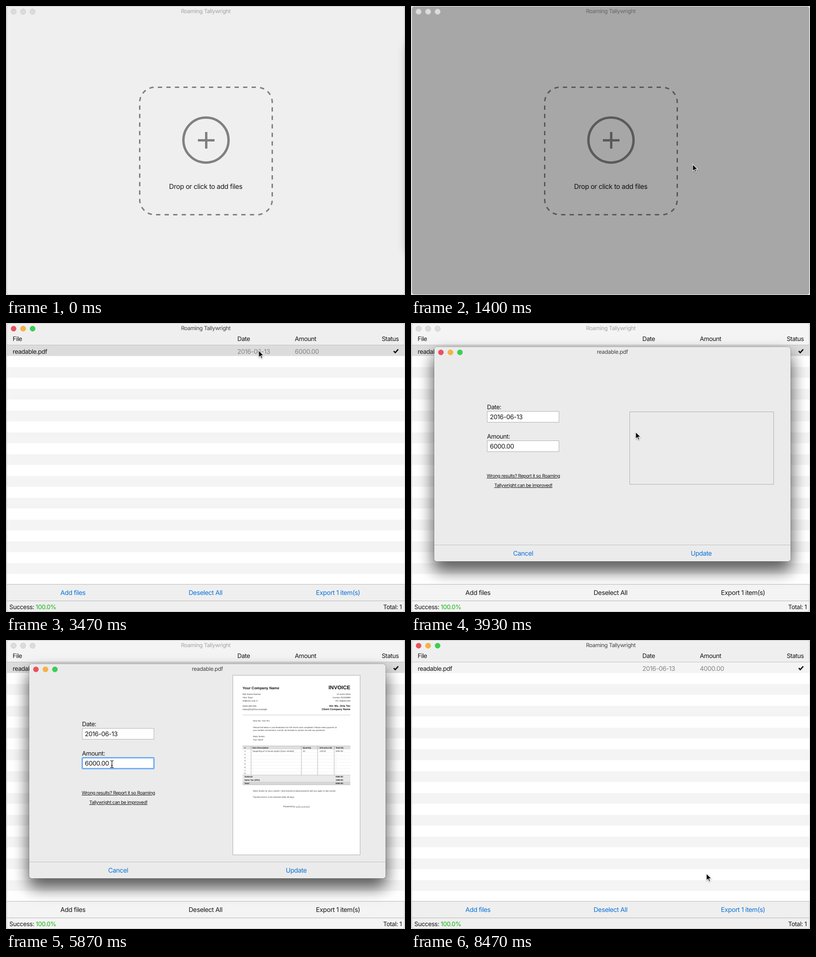
Animation of 840 by 610 pixels, one loop 8540 ms. Source, as an HTML page:

```html
<!DOCTYPE html>
<html lang="en">
<head>
<meta charset="utf-8">
<title>Roaming Tallywright</title>
<style>
html, body { margin: 0; width: 100%; height: 100%; overflow: hidden; background: #dedede; }
svg { display: block; width: 840px; height: 610px; }
text { font: 13px Inter, "Open Sans", sans-serif; letter-spacing: -.45px; fill: #161616; white-space: pre; text-rendering: geometricPrecision; }
.title { font-size: 11.7px; letter-spacing: -.4px; fill: #444; }
.num { font-size: 13.4px; letter-spacing: -.42px; }
.big { font-size: 14.3px; letter-spacing: -.4px; }
.btn { font-size: 13.6px; letter-spacing: -.42px; fill: #0a72d8; }
.note { font-size: 9.8px; letter-spacing: -.4px; text-decoration: underline; }
.grey { fill: #858585; }
.mid { text-anchor: middle; }
.end { text-anchor: end; }
#page text { font: 4.7px "Liberation Sans", Arial, sans-serif; letter-spacing: 0; fill: #333; }
#page .b { font-weight: bold; fill: #111; }
#page .s { font-size: 4.3px; }
</style>
</head>
<body>
<svg id="stage" viewBox="0 0 840 610"></svg>
<script>
const LOOP = 8540, STEP = 200 / 3;
const APP = ['Roaming', 'Tallywright'];

const text = (x, y, s, cls = '', more = '') => `<text x="${x}" y="${y}" class="${cls}" ${more}>${s}</text>`;
const rect = (x, y, w, h, fill, more = '') => `<rect x="${x}" y="${y}" width="${w}" height="${h}" fill="${fill}" ${more}/>`;
const line = (x1, y1, x2, y2, c, w = 1) => `<path d="M${x1} ${y1}L${x2} ${y2}" stroke="${c}" stroke-width="${w}" fill="none"/>`;
const range = n => [...Array(n).keys()];
const hues = ['#ee4f5c', '#f8b33e', '#38d150'];
const lights = (x, y) => hues.map((c, i) =>
  `<circle cx="${x + 20 * i}" cy="${y}" r="5.7" fill="${c}" stroke="#000" stroke-opacity=".08"/>`).join('');

// The dashed outline holds 58 dashes, with gaps as long as the dashes.
function dropView() {
  return `<g id="drop">
    <g fill="none" stroke="#808080">
      <rect x="281.5" y="171.5" width="279" height="269" rx="32" stroke-width="3" pathLength="116" stroke-dasharray="1 1" stroke-dashoffset="-.69"/>
      <circle cx="421" cy="283" r="47.5" stroke-width="5"/>
      <path d="M404 283.5H439M421.5 266V301" stroke-width="5"/>
    </g>
    ${text(420.5, 386, 'Drop or click to add files', 'big mid')}
    ${rect(850, 80, 60, 440, '#000', 'id="edge" opacity=".5" style="filter:blur(12px)"')}
  </g>`;
}

function listView() {
  const stripes = range(11).map(i => rect(2, 47 + 46 * i, 837, 22.5, '#f4f4f4')).join('');
  return `<g id="list">
    ${rect(2, 46, 837, 505, '#fff')}${stripes}
    ${rect(2, 47, 837, 22.5, '#dcdcdc', 'id="picked"')}
    ${line(2, 46.5, 839, 46.5, '#c2c2c2')}
    ${text(14, 38, 'File')}${text(487, 38, 'Date')}${text(608, 38, 'Amount')}${text(827, 38, 'Status', 'end')}
    ${text(14, 65, 'readable.pdf')}
    ${text(487, 65, '2016-06-13', 'num grey')}${text(608, 65, '', 'num grey', 'id="sum"')}
    <path d="M816.3 59.3l3.2 3.3 6.2-6.9" fill="none" stroke="#111" stroke-width="2.7"/>
    ${line(2, 551.5, 839, 551.5, '#b9b9b9')}${line(2, 586.5, 839, 586.5, '#b9b9b9')}
    <g id="tools">${text(141, 574, 'Add files', 'btn mid')}${text(420, 574, '', 'btn mid', 'id="all"')}${text(699, 574, '', 'btn mid', 'id="export"')}</g>
    ${text(7, 604, 'Success: <tspan fill="#0fb50f">100.0%</tspan>')}
    ${text(833, 604, 'Total: 1', 'end')}
  </g>`;
}

function invoice() {
  const t = text, cols = [516, 622, 656, 691];
  const body = [
    [171, 'Dear Ms. Orla Tev,'],
    [184.5, 'Please find below a cost-breakdown for the recent work completed. Please make payment at'],
    [191, 'your earliest convenience, and do not hesitate to contact me with any questions.'],
    [204, 'Many thanks,'], [211, 'Your Name'],
    [319, 'Many thanks for your custom! I look forward to doing business with you again in due course.'],
    [332, 'Payment terms: to be received within 60 days.']
  ].map(([y, s]) => t(520, y + 1.3, s, 's')).join('');
  const rows = range(8).map(i => {
    const y = 236.2 + 6.75 * i;
    return t(502, y, i + 1, 's') + (i ? t(694, y, '-', 's') + line(498, y - 5.2, 725, y - 5.2, '#e6e6e6', .5) : '');
  }).join('');
  const sums = [['Subtotal', '5000.00'], ['Sales Tax (20%)', '1000.00'], ['Total', '6000.00']].map(([a, b], i) =>
    rect(498, 285 + 6.9 * i, 227, 6.9, i > 1 ? '#d6d6d6' : '#e9e9e9') +
    t(502, 290.2 + 6.9 * i, a, 'b s') + t(694, 290.2 + 6.9 * i, b, 'b s')).join('');
  return `<g id="page">
    ${rect(477.5, 74.5, 268, 379, '#fff', 'stroke="#b0b0b0"')}
    ${t(498, 103.5, 'Your Company Name', 'b', 'style="font-size:7.7px"')}
    ${t(725, 104, 'INVOICE', 'b end', 'style="font-size:11.2px"')}
    ${t(498, 115.5, '940 Some Avenue')}${t(498, 122.5, 'Your Town')}${t(498, 129.5, 'Address Line 3')}
    ${t(498, 141, '(000) 000 000')}${t(498, 148, 'inbox@myfirma.example')}
    ${t(725, 115.5, '13-June-2016', 'end')}${t(725, 122.5, 'Invoice #2334889', 'end')}${t(725, 129.5, 'PO 456001200', 'end')}
    ${t(725, 141, 'Att: Ms. Orla Tev', 'b end', 'style="font-size:5.7px"')}
    ${t(725, 148, 'Client Company Name', 'b end', 'style="font-size:5.7px"')}
    ${line(498, 158.3, 725, 158.3, '#bbb', .8)}
    ${body}
    ${rect(498, 223.5, 227, 7.3, '#dedede')}
    ${t(502, 229, '#', 'b s')}${t(519, 229, 'Item Description', 'b s')}${t(625, 229, 'Quantity', 'b s')}${t(660, 229, 'Unit price (€)', 'b s')}${t(694, 229, 'Total (€)', 'b s')}
    ${rows}${t(519, 236.2, 'Supporting of in-house project (hours worked)', 's')}${t(625, 236.2, '40', 's')}${t(660, 236.2, '125.00', 's')}${t(694, 236.2, '5000.00', 's')}
    ${cols.map(x => line(x, 224, x, 285, '#999', .7)).join('')}
    ${sums}
    ${line(498, 223.5, 725, 223.5, '#aaa', .6)}${line(498, 285, 725, 285, '#aaa', .6)}${line(498, 305.7, 725, 305.7, '#aaa', .6)}
    ${t(611.5, 352.5, 'Powered by <tspan fill="#888" text-decoration="underline">quillo.example</tspan>', 'mid')}
  </g>`;
}

function detailView() {
  const field = y => rect(160.5, y, 151, 23, '#fff', 'stroke="#b2b2b2"');
  return `<g id="detail">
    ${rect(49, 51, 750, 452, '#ebebeb', 'rx="5" style="filter:drop-shadow(0 18px 17px rgba(0,0,0,.55)) drop-shadow(0 0 1px rgba(0,0,0,.45))"')}
    ${line(53, 51.5, 795, 51.5, '#f8f8f8')}
    ${lights(63, 62)}${text(424, 65, 'readable.pdf', 'title mid')}
    ${text(160, 182, 'Date:')}${field(186.5)}${text(166, 203, '2016-06-13', 'num')}
    ${text(160, 244, 'Amount:')}${field(248.5)}
    ${rect(160.5, 248.5, 151, 23, 'none', 'id="focus" rx="2" stroke="#78b0f3" stroke-width="3"')}
    ${rect(166, 252, 0, 16, '#b4d5fe', 'id="mark"')}
    ${text(166, 265, '', 'num', 'id="amount"')}
    ${rect(166, 252, 1, 16, '#111', 'id="caret"')}
    ${text(236.5, 326, 'Wrong results? Report it so ' + APP[0], 'note mid')}
    ${text(236.5, 346, APP[1] + ' can be improved!', 'note mid')}
    ${rect(460.5, 187.5, 303, 153, 'none', 'id="empty" stroke="#b0b0b0"')}
    ${invoice()}
    <g id="pressed">
      <path d="M49 469H424V503H54Q49 503 49 498Z" fill="#f5f5f5"/>
      <path d="M424 469H799V498Q799 503 794 503H424Z" fill="#4f97f7"/>
    </g>
    ${line(49, 468.5, 799, 468.5, '#c0c0c0')}
    ${text(236, 491, 'Cancel', 'btn mid')}${text(611, 491, 'Update', 'btn mid', 'id="update"')}
  </g>`;
}

document.getElementById('stage').innerHTML = `
  ${rect(1.5, .5, 837.5, 609, '#efefef', 'id="frame" rx="5" stroke="#bdbdbd"')}
  ${dropView()}${listView()}
  ${rect(2, 1, 836.5, 608, '#000', 'id="dim" rx="5" opacity=".3"')}
  <g id="off">${range(3).map(i => `<circle cx="${16 + 20 * i}" cy="12" r="5.7" fill="#dcdcdc" stroke="#cfcfcf"/>`).join('')}</g>
  <g id="on">${lights(16, 12)}</g>
  ${text(420.5, 15, APP.join(' '), 'title mid', 'id="name"')}
  ${detailView()}
  <g id="pointer">
    <circle id="ring" r="22.3" cy=".5" fill="#fff" fill-opacity=".12" stroke="#111" stroke-width="1.6"/>
    <path id="arrow" d="M0 0V14.6L3.4 11.4 5.7 16.8 8.1 15.8 5.8 10.5H10.6Z" fill="#000" stroke="#fff" stroke-width="1.1" style="filter:drop-shadow(0 1px 1px rgba(0,0,0,.35))"/>
    <path id="beam" d="M-3.5-7.5Q0-7.5 0-5Q0-7.5 3.5-7.5M0-5V5M-3.5 7.5Q0 7.5 0 5Q0 7.5 3.5 7.5M-2 2.5H2" fill="none" stroke="#111" stroke-width="1.2"/>
  </g>`;

const el = Object.fromEntries([...document.querySelectorAll('[id]')].map(e => [e.id, e]));
const show = (id, on) => { el[id].style.display = on ? '' : 'none'; };
const put = (id, s) => { if (el[id].textContent !== s) el[id].textContent = s; };

// time, x, y
const path = [
  [500, 856, 425], [1333, 593, 334], [1600, 593, 334], [2467, 547, 87], [2733, 532, 58], [3467, 532, 58],
  [3933, 473, 230], [4100, 466, 240], [4700, 466, 240], [5533, 223, 262], [5933, 223, 262],
  [6200, 164, 262], [6733, 164, 262], [7533, 622, 493], [LOOP, 622, 493]
];
const presses = [[500, 1380], [3250, 3310], [3390, 3450], [5650, 5730], [5950, 6210], [7850, 8080]];
const OPEN = 3520, CLOSE = 8180;

function locate(t) {
  const i = path.findIndex(p => p[0] > t);
  if (i < 1) return path[i ? path.length - 1 : 0].slice(1);
  const [t0, x0, y0] = path[i - 1], [t1, x1, y1] = path[i];
  const u = (t - t0) / (t1 - t0), k = u * u * (3 - 2 * u);
  return [x0 + (x1 - x0) * k, y0 + (y1 - y0) * k];
}

function draw(t) {
  const within = (a, b) => t >= a && t < b;
  const list = t >= 1500, open = within(OPEN, CLOSE), dark = within(780, 1500);
  const active = within(2150, OPEN) || t >= CLOSE;
  const picked = t >= 3250;

  show('drop', !list);
  show('edge', !dark);
  show('dim', dark);
  show('list', list);
  el.frame.setAttribute('stroke', dark ? '#e8e8e8' : '#bdbdbd');
  el.frame.setAttribute('fill', list && !active ? '#f4f4f4' : '#efefef');
  show('on', active);
  show('off', !active);
  el.name.style.fill = active ? '#444' : dark ? '#666' : '#a3a3a3';
  show('picked', within(3250, CLOSE));
  put('sum', t < CLOSE ? '6000.00' : '4000.00');
  put('all', picked ? 'Deselect All' : 'Select All');
  put('export', picked ? 'Export 1 item(s)' : 'Export');
  for (const b of el.tools.children) b.style.fill = active ? '' : '#161616';

  const [x, y] = locate(t);
  show('detail', open);
  if (open) {
    const typed = Math.floor((t - 6320) / STEP) + 1;
    const marked = within(5950, 6320), down = t >= 7850;
    show('empty', t < 3980);
    show('page', t >= 3980);
    show('focus', within(5650, 7850));
    put('amount', typed > 0 ? '4000.00'.slice(0, typed) : '6000.00');
    show('mark', marked);
    if (marked) {
      const from = Math.min(217, Math.max(166, x));
      el.mark.setAttribute('x', from);
      el.mark.setAttribute('width', 217 - from);
    }
    show('caret', within(6320, 6800));
    el.caret.setAttribute('x', 166.5 + el.amount.getComputedTextLength());
    show('pressed', down);
    el.update.style.fill = down ? '#fff' : '';
  }

  const beam = open && x > 160 && x < 312 && (Math.abs(y - 260) < 12 || Math.abs(y - 198) < 12);
  show('pointer', t >= 500);
  show('arrow', !beam);
  show('beam', beam);
  show('ring', presses.some(p => within(...p)));
  el.pointer.setAttribute('transform', `translate(${x.toFixed(1)} ${y.toFixed(1)})`);
}

const start = performance.now();
function tick() {
  const t = (performance.now() - start) % LOOP;
  draw(Math.floor((t + 5) / STEP) * STEP);
  requestAnimationFrame(tick);
}
draw(0);
tick();
</script>
</body>
</html>
```
